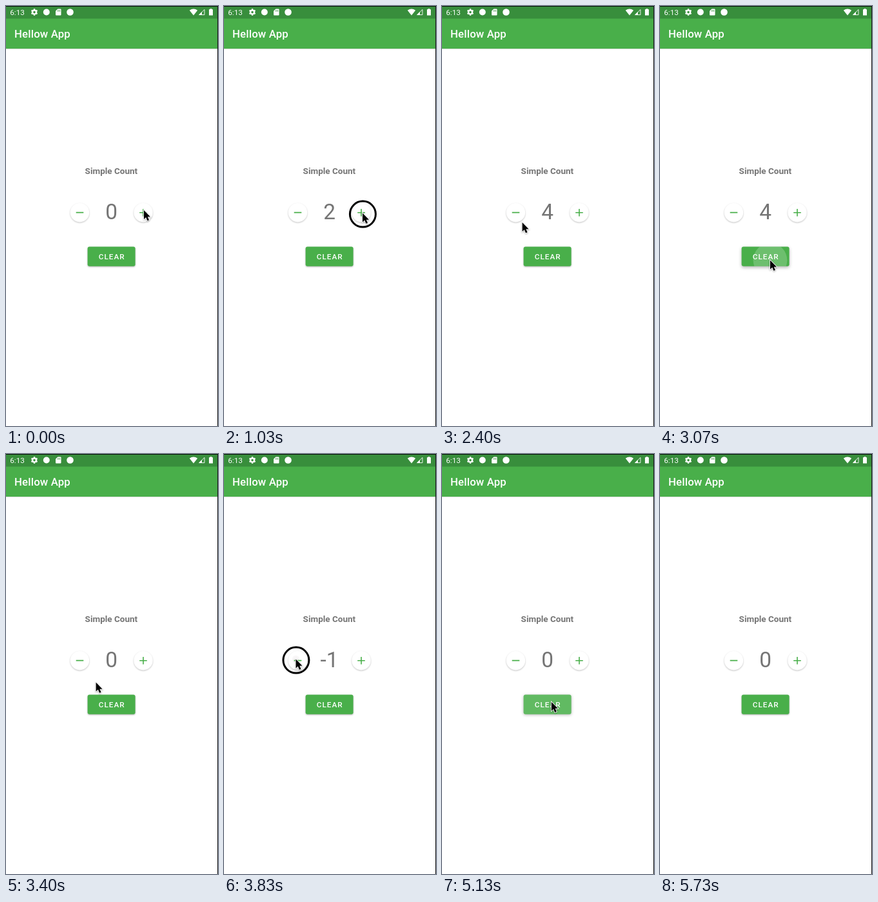
These frames come from a looping animation (329 px wide and 650 px high, 6.31 s). An HTML page:

```html
<!DOCTYPE html>
<html lang="en">
<head>
<meta charset="utf-8">
<title>Counter</title>
<style>
  html, body { margin: 0; width: 100%; height: 100%; overflow: hidden; background: #fff; }
  svg { display: block; width: 329px; height: 650px; }
  text { font-family: Roboto, sans-serif; }
  .fab { fill: #fff; filter: drop-shadow(0 1px 1px rgba(0,0,0,.24)); }
  .icon { stroke: #49af4a; stroke-width: 1.6; }
  .arrow { fill: #000; stroke: #fff; stroke-width: 1.6; paint-order: stroke; filter: drop-shadow(0 1px 1px rgba(0,0,0,.3)); }
</style>
</head>
<body>
<svg viewBox="0 0 329 650">
  <defs>
    <clipPath id="clearClip"><rect x="126.6" y="372.5" width="74" height="30.3" rx="3"/></clipPath>
    <clipPath id="fabClip"><circle cx="114.5" cy="319.7" r="14.7"/><circle cx="213" cy="319.7" r="14.7"/></clipPath>
  </defs>
  <rect width="329" height="650" fill="#fff"/>
  <rect y="19" width="328" height="47" fill="#49af4a"/>
  <rect y="66" width="328" height="1" fill="#000" opacity=".12"/>
  <rect width="328" height="19.5" fill="#388e3c"/>

  <g fill="#fff">
    <text x="6.3" y="13.6" font-size="11.7">6:13</text>
    <g transform="translate(44 9.5)" fill="none" stroke="#fff" stroke-width="2.4">
      <circle r="2.9"/>
      <path id="teeth"/>
    </g>
    <circle cx="62.8" cy="9.5" r="5"/>
    <path d="M80.3 4.5H84.5Q85.5 4.5 85.5 5.5V13.5Q85.5 14.5 84.5 14.5H78Q77 14.5 77 13.5V7.8Z"/>
    <path d="M80.3 6.3V8.6M82 6.3V8.6M83.7 6.3V8.6" stroke="#388e3c" stroke-width=".8"/>
    <circle cx="99.5" cy="9.5" r="5.3"/>
    <path d="M284.8 6.8Q291 2.2 297.2 6.8L291 14.4Z"/>
    <path d="M308 5.5V13.6H299.8Z" fill="none" stroke="#fff" stroke-width=".9"/>
    <path d="M304 9V14H299Z"/>
    <path d="M316.5 5.2V4.2H319.5V5.2H321V14.5H315V5.2Z"/>
    <text x="13" y="49.2" font-size="16.7" font-weight="500" letter-spacing=".2">Hellow App</text>
  </g>

  <g fill="#757575" text-anchor="middle">
    <text x="163.4" y="260.2" font-size="13.5" font-weight="700">Simple Count</text>
    <text id="count" x="163.6" y="330.2" font-size="33.4">0</text>
  </g>

  <circle class="fab" cx="114.5" cy="319.7" r="14.7"/>
  <circle class="fab" cx="213" cy="319.7" r="14.7"/>
  <circle id="fabRipple" clip-path="url(#fabClip)" fill="#806070"/>
  <path class="icon" d="M108.7 319.6H120.3M207.2 319.7H218.8M213 313.9V325.5"/>

  <rect id="clear" x="126.6" y="372.5" width="74" height="30.3" rx="3" fill="#49af4a"/>
  <g clip-path="url(#clearClip)"><circle id="clearRipple" fill="#fff"/></g>
  <text x="164.2" y="392" font-size="11.7" font-weight="500" letter-spacing="1.04" text-anchor="middle" fill="#fff">CLEAR</text>

  <circle id="ring" r="20" fill="none" stroke="#000" stroke-width="3"/>
  <path id="cursor" class="arrow" d="M0 0V14L3.2 11.1 5.4 16.3 8 15.2 5.8 10.2H10Z"/>
  <path d="M0 .5H329M328.5 0V650" stroke="#000" stroke-opacity=".9"/>
</svg>
<script>
  const LOOP = 6310, HIDE = 5730, HOLD = 100;
  const $ = id => document.getElementById(id);
  const clamp = v => Math.max(0, Math.min(1, v));
  const ease = k => k * k * (3 - 2 * k);
  const show = (el, on) => el.setAttribute('visibility', on ? 'visible' : 'hidden');
  const series = (start, every, n) => Array.from({ length: n }, (_, i) => start + every * i);

  // Each button changes the count a little after a tap
  const plus = { taps: series(30, 333, 5), lag: 350, next: n => n + 1 };
  const minus = { taps: [2170, ...series(3600, 210, 4)], lag: 220, next: n => n - 1 };
  const clear = { taps: [2930, 4770], lag: 220, next: () => 0 };
  const taps = [plus, minus, clear]
    .flatMap(b => b.taps.map(at => ({ at, due: at + b.lag, next: b.next })))
    .sort((a, b) => a.due - b.due);
  const fabTaps = [...plus.taps, ...minus.taps].sort((a, b) => a - b);

  // Pointer moves; sag bends a move downwards
  const home = [214, 316];
  const moves = [
    { from: 30, to: 1000, at: [215, 320.5] },
    { from: 1470, to: 2070, at: [116, 319], sag: 12 },
    { from: 2300, to: 2700, at: [170, 420] },
    { from: 2740, to: 2900, at: [171, 393.5] },
    { from: 3230, to: 3560, at: [111.5, 317.5] },
    { from: 4330, to: 4570, at: [163.3, 326] },
    { from: 4570, to: 4700, at: [166, 385] },
    { from: 5100, to: 5300, at: [225, 364] },
    { from: 5300, to: HIDE, at: [318, 508] }
  ];

  function pointer(t) {
    let [x, y] = home;
    for (const { from, to, at, sag = 0 } of moves) {
      const k = ease(clamp((t - from) / (to - from)));
      x += (at[0] - x) * k;
      y += (at[1] - y) * k + sag * Math.sin(Math.PI * k);
    }
    return [x, y];
  }

  function ripple(el, t, list, from, to, grow, life, alpha) {
    const tap = list.findLast(p => p <= t && t < p + life);
    show(el, tap !== undefined);
    if (tap === undefined) return;
    const age = t - tap, [x, y] = pointer(tap);
    el.setAttribute('cx', x);
    el.setAttribute('cy', y);
    el.setAttribute('r', from + (to - from) * clamp(age / grow));
    el.setAttribute('opacity', alpha * clamp((life - age) / 150));
  }

  function draw(t) {
    const [x, y] = pointer(t);
    $('cursor').setAttribute('transform', `translate(${x} ${y})`);
    show($('cursor'), t < HIDE);
    $('ring').setAttribute('cx', x + .4);
    $('ring').setAttribute('cy', y + 1.6);
    show($('ring'), taps.some(p => t >= p.at && t < p.at + HOLD));
    $('count').textContent = taps.reduce((n, p) => p.due <= t ? p.next(n) : n, 0);

    ripple($('fabRipple'), t, fabTaps, 4, 20, 200, 200, .06);
    ripple($('clearRipple'), t, clear.taps, 10, 46, 310, 460, .2);
    const lift = Math.max(...clear.taps.map(p => clamp((t - p) / 100) * clamp((p + 460 - t) / 150)));
    const drop = 1 + 1.5 * lift;
    $('clear').style.filter = `drop-shadow(0 ${drop}px ${drop}px rgba(0,0,0,.3))`;
  }

  $('teeth').setAttribute('d', series(30, 60, 6).map(deg => {
    const a = deg * Math.PI / 180, c = Math.cos(a), s = Math.sin(a);
    return `M${3 * c} ${3 * s}L${5.2 * c} ${5.2 * s}`;
  }).join(''));

  const start = performance.now();
  function tick() {
    draw((performance.now() - start) % LOOP);
    requestAnimationFrame(tick);
  }
  tick();
</script>
</body>
</html>
```
